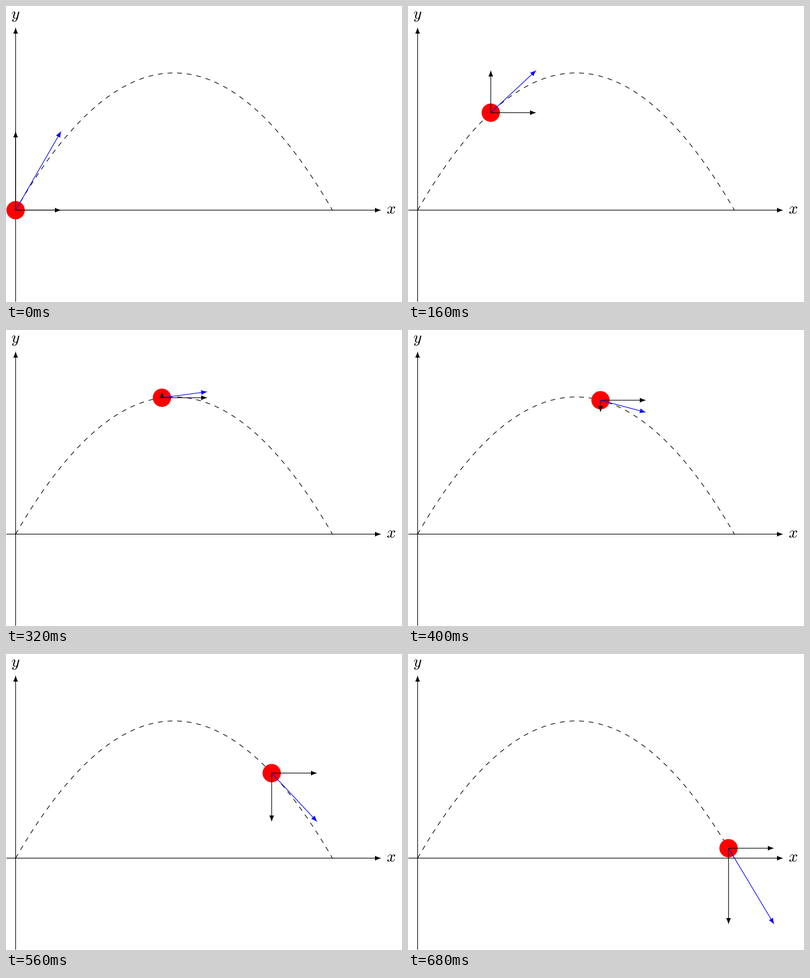
Animation of 866x647 px, one loop 700 ms. Source, as a matplotlib script:

```python
import numpy as np
import matplotlib.pyplot as plt
from matplotlib.animation import FuncAnimation
from matplotlib.patches import Circle, PathPatch
from matplotlib.path import Path
from matplotlib.textpath import TextPath

plt.rcParams["mathtext.fontset"] = "cm"
plt.rcParams["path.simplify"] = False

W, H, DPI = 866, 647, 100
OX, OY = 21, 446.3            # launch point, from the top left corner
FRAMES, INTERVAL = 35, 20
STEP = 20                     # horizontal advance per frame
SPEED = 100                   # length of the horizontal arrow
SLOPE = np.sqrt(3)
BEND = 0.0025
PT = 254 / 72.27              # pixels in one typographic point
STROKE = 0.4 * PT
LW = STROKE * 72 / DPI

fig = plt.figure(figsize=(W / DPI, H / DPI), dpi=DPI, facecolor="white")
ax = fig.add_axes([0, 0, 1, 1])
ax.set_xlim(-OX, W - OX)
ax.set_ylim(OY - H, OY)
ax.axis("off")


def height(x):
    return SLOPE * x - BEND * x ** 2


class Arrow:
    """Thin shaft with a slender curved head whose point is the end."""

    HEAD = STROKE * np.array([
        (0, 0), (-2.667, 0.5), (-7, 2), (-10, 3.75),
        (-10, -3.75), (-7, -2), (-2.667, -0.5), (0, 0)])
    CODES = [Path.MOVETO] + [Path.CURVE4] * 3 + [Path.LINETO] + [Path.CURVE4] * 3

    def __init__(self, color, z):
        self.shaft, = ax.plot([], [], color=color, lw=LW, zorder=z,
                              solid_capstyle="butt", snap=False)
        self.head = PathPatch(Path(self.HEAD, self.CODES), fc=color, lw=0,
                              zorder=z, snap=False)
        ax.add_patch(self.head)

    def place(self, x, y, dx, dy):
        ux, uy = np.array([dx, dy]) / np.hypot(dx, dy)
        end = np.array([x + dx, y + dy])
        neck = end - 9 * STROKE * np.array([ux, uy])
        self.shaft.set_data([x, neck[0]], [y, neck[1]])
        turn = np.array([[ux, uy], [-uy, ux]])
        self.head.set_path(Path(self.HEAD @ turn + end, self.CODES))


def label(text, x, y):
    ax.add_patch(PathPatch(TextPath((x, y), text, size=10 * PT),
                           fc="black", lw=0, snap=False))


Arrow("black", 1).place(-20, 0, 820, 0)
Arrow("black", 1).place(0, -200, 0, 600)
label("$x$", 811.7, -2.153 * PT)
label("$y$", -9.2, 418.6)

track = np.linspace(0, SLOPE / BEND, 400)
ax.plot(track, height(track), color="black", lw=LW, zorder=2,
        linestyle=(0, (7.5, 7.5)), dash_capstyle="butt", snap=False)

ball = Circle((0, 0), 20, fc="red", lw=0, zorder=3)
ax.add_patch(ball)
across = Arrow("black", 4)
upright = Arrow("black", 4)
velocity = Arrow("blue", 5)


def update(i):
    x = STEP * i
    y = height(x)
    rise = SPEED * (SLOPE - 2 * BEND * x)
    ball.center = x, y
    across.place(x, y, SPEED, 0)
    upright.place(x, y, 0, rise)
    velocity.place(x, y, SPEED, rise)
    return []


anim = FuncAnimation(fig, update, frames=FRAMES, interval=INTERVAL,
                     repeat=True, repeat_delay=0, blit=False)
plt.show()
```
